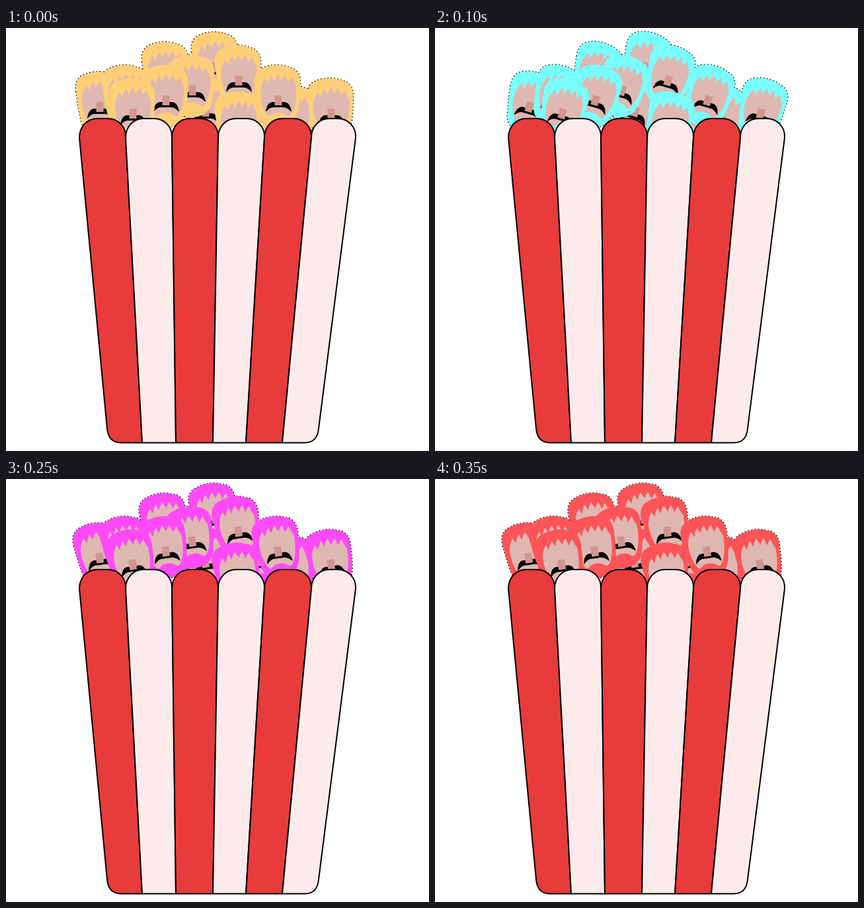
Animation, 640 px wide and 640 px high, one loop 0.4 s. Source, as an HTML page with a canvas:

```html
<!DOCTYPE html>
<html lang="en">
<head>
<meta charset="utf-8">
<title>Popcorn heads</title>
<style>
  html, body { margin: 0; width: 100%; height: 100%; overflow: hidden; background: #fff; }
  canvas { display: block; width: 100vmin; height: 100vmin; }
</style>
</head>
<body>
<canvas id="stage" width="640" height="640"></canvas>
<script>
const ctx = document.getElementById('stage').getContext('2d');

const STEP = 50;
const SWING = 8;
const HAIR = ['#ffcf78', '#80ff76', '#79fffb', '#7da5ff', '#d27aff', '#ff4afa', '#ff4fa8', '#ff5458'];
const SKIN = '#deb8b1', NOSE = '#d0968f', RED = '#e83b3b', CREAM = '#fcebea';

// Nose x and hair top y of each head, back to front
const HEADS = [
  [317, 6], [242, 21], [302, 73], [382, 71], [432, 86], [352, 26], [282, 41],
  [142, 66], [182, 56], [242, 56], [192, 76], [412, 56], [352, 96], [492, 76]
];
const PIVOT = 56;

// Head parts, relative to the nose line and the top of the hair
const outline = new Path2D(
  'M-36 31 C-38 17 -33 7 -22 4 C-12 -1 6 -1 15 3 C19 5 23 4 27 9 ' +
  'C33 14 34 24 33 34 C33 48 32 64 28 76 C24 88 12 94 0 94 ' +
  'C-14 94 -24 88 -28 76 C-31 64 -34 46 -36 31 Z');
const face = new Path2D(
  'M-27 40 Q-26 29 -20 21 L-16 29 Q-14 21 -10 16 L-6 25 Q-4 18 0 14 L5 24 ' +
  'Q7 18 11 15 L15 26 Q17 21 21 18 Q23 25 27 32 C28 48 26 64 20 74 ' +
  'Q16 80 12 76 Q8 72 0 72 Q-8 72 -11 76 Q-15 80 -19 74 C-24 64 -27 54 -27 40 Z');
const moustache = new Path2D(
  'M-19 71 C-18 60 -13 55 -7 56 L7 56 C14 55 19 61 20 71 ' +
  'C16 67 12 64 8 64 L-8 64 C-12 64 -15 67 -19 71 Z');

// Stripe edges at the rim and at the base of the bucket
const RIM = [111, 181, 251, 321, 391, 462, 529];
const BASE = [154, 206, 257, 313, 363, 418, 472];
const RIM_Y = 137, SIDE_Y = 166, BASE_Y = 627.5;

function stripe(i) {
  const l = RIM[i], r = RIM[i + 1], bl = BASE[i], br = BASE[i + 1];
  const p = new Path2D();
  p.moveTo(l, SIDE_Y);
  p.bezierCurveTo(l, 149, l + 12, RIM_Y, l + 27, RIM_Y);
  p.lineTo(r - 27, RIM_Y);
  p.bezierCurveTo(r - 12, RIM_Y, r + 1, 149, r, SIDE_Y);
  if (i === 5) {
    p.lineTo(br + 1, 606);
    p.quadraticCurveTo(br - 1, BASE_Y, br - 20, BASE_Y);
  } else {
    p.lineTo(br, BASE_Y);
  }
  if (i === 0) {
    p.lineTo(bl + 20, BASE_Y);
    p.quadraticCurveTo(bl + 1, BASE_Y, bl - 1, 606);
  } else {
    p.lineTo(bl, BASE_Y);
  }
  p.closePath();
  return p;
}
const stripes = RIM.slice(1).map((_, i) => stripe(i));

function eachHead(angle, paint) {
  for (const [x, y] of HEADS) {
    ctx.save();
    ctx.translate(x, y + PIVOT);
    ctx.rotate(angle);
    ctx.translate(0, -PIVOT);
    paint();
    ctx.restore();
  }
}

function fill(path, color) {
  ctx.fillStyle = color;
  ctx.fill(path);
}

function drawHeads(angle, hair) {
  // Broken rim around the whole heap; the fills hide its inner parts
  ctx.strokeStyle = '#000';
  ctx.lineWidth = 2;
  ctx.setLineDash([2, 3]);
  eachHead(angle, () => ctx.stroke(outline));
  ctx.setLineDash([]);

  eachHead(angle, () => {
    fill(outline, hair);
    fill(face, SKIN);
    fill(moustache, '#000');
    ctx.fillStyle = NOSE;
    ctx.fillRect(-5.5, 46, 11, 15);
  });
}

function drawBucket() {
  ctx.strokeStyle = '#000';
  ctx.lineWidth = 2;
  ctx.lineJoin = 'round';
  stripes.forEach((path, i) => {
    fill(path, i % 2 ? CREAM : RED);
    ctx.stroke(path);
  });
}

function draw(time) {
  const step = Math.floor(time / STEP) % HAIR.length;
  // Triangle wave: 0, 1, 2, 1, 0, -1, -2, -1
  const sway = 2 - Math.abs((step + 2) % 8 - 4);
  ctx.fillStyle = '#fff';
  ctx.fillRect(0, 0, 640, 640);
  drawHeads(sway * SWING * Math.PI / 180, HAIR[step]);
  drawBucket();
}

let start;
function tick(now) {
  if (start === undefined) start = now;
  draw(Math.max(0, now - start));
  requestAnimationFrame(tick);
}
draw(0);
requestAnimationFrame(tick);
</script>
</body>
</html>
```
